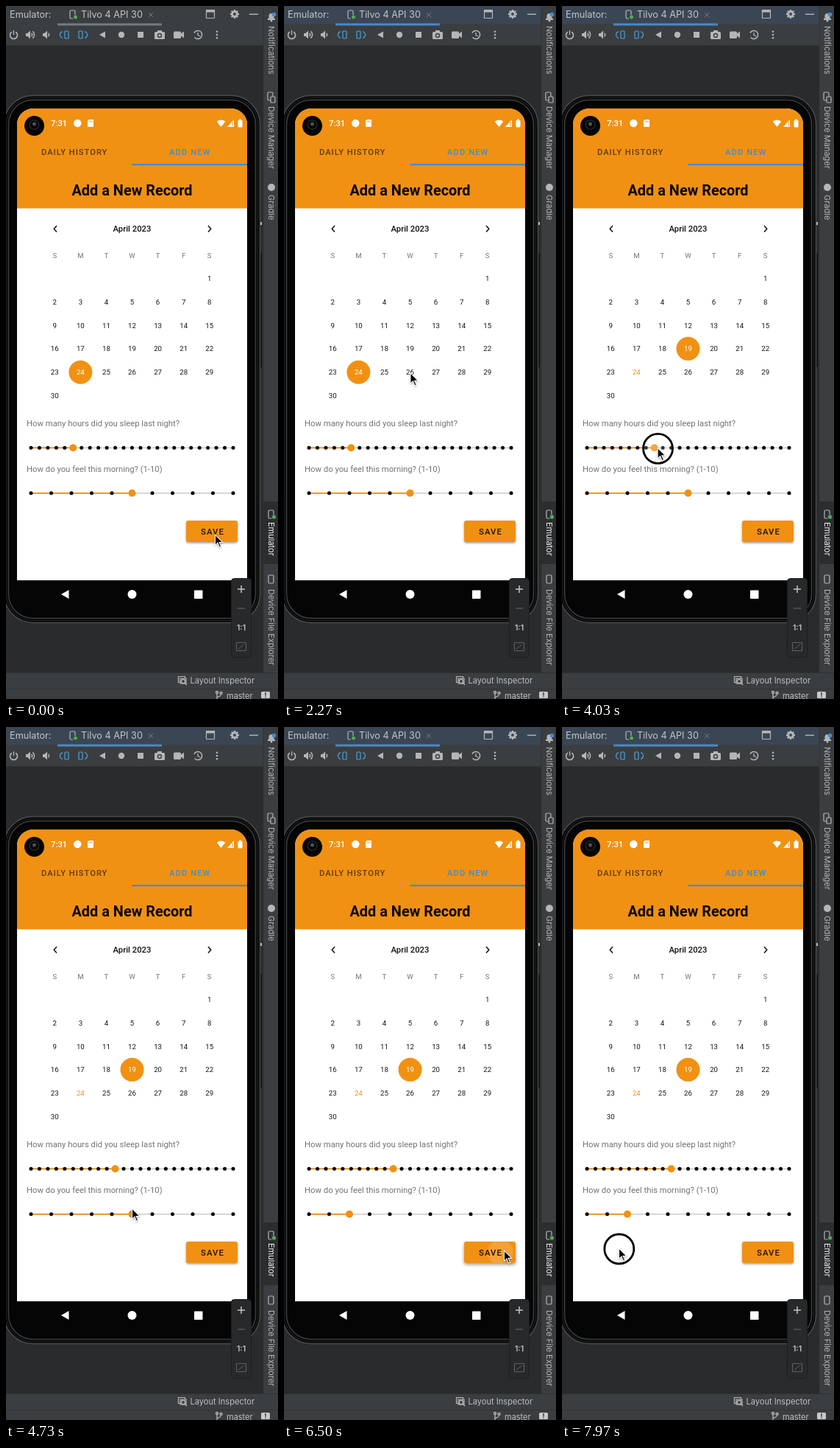
An HTML page with a canvas for the animation above (8 s loop, 370 by 940 pixels).

```html
<!DOCTYPE html>
<html lang="en">
<head>
<meta charset="utf-8">
<title>Add a New Record</title>
<style>
html, body { margin: 0; width: 100%; height: 100%; overflow: hidden; background: #2a2b2d; }
canvas { display: block; width: 370px; height: 940px; }
</style>
</head>
<body>
<canvas id="stage"></canvas>
<script>
const W = 370, H = 940, LOOP = 8000;
const ORANGE = '#f19113', PANEL = '#3b3e40', EDGE = '#303234', ICON = '#b4b6b8', BLUE = '#3c8ed2';
const APP = 'Roboto, sans-serif', UI = 'Inter, sans-serif';
const canvas = document.getElementById('stage');
const c = canvas.getContext('2d');
const dpr = window.devicePixelRatio || 1;
canvas.width = W * dpr;
canvas.height = H * dpr;

const clamp = (v, a = 0, b = 1) => Math.min(b, Math.max(a, v));
const lerp = (a, b, p) => a + (b - a) * p;
const between = (t, a, b) => clamp((t - a) / (b - a));
const ease = p => p * p * (3 - 2 * p);

// Layout
const screen = { x: 15, y: 139, w: 313, h: 640, mid: 171.5 };
const save = { x: 245, y: 698, w: 70, h: 29, r: 3 };
const sleep = { y: 599.3, steps: 24, from: 5, to: 10, start: 3680, end: 4250 };
const mood = { y: 660.8, steps: 10, from: 5, to: 2, start: 5040, end: 5600 };
const tickX = (s, i) => 34 + 275 * i / s.steps;
const onTick = (s, i) => ({ x: tickX(s, i), y: s.y - 1 });
const columnX = i => screen.mid + 35.07 * (i - 3);
const dayAt = d => ({ x: columnX((d + 5) % 7), y: 369.3 + 31.85 * Math.floor((d + 5) / 7) });

// Pointer stops: arrival, hold, place, click
const stop = (t, hold, place, click) => ({ t, hold, click, ...place });
const STOPS = [
  stop(0, 600, { x: 284, y: 716 }, true),
  stop(1170, 0, { x: 209, y: 644 }),
  stop(2270, 0, dayAt(26)),
  stop(2500, 350, dayAt(19), true),
  stop(3230, 0, { x: 162, y: 561 }),
  stop(3550, 130, onTick(sleep, sleep.from)),
  stop(sleep.end, 150, onTick(sleep, sleep.to)),
  stop(4730, 0, { x: 171, y: 652 }),
  stop(4920, 120, onTick(mood, mood.from)),
  stop(mood.end, 150, onTick(mood, mood.to)),
  stop(6250, 430, { x: 299, y: 709 }, true),
  stop(7870, 130, { x: 77, y: 706 }, true)
];
const RIPPLES = [{ t: 780, x: 284 }, { t: 6400, x: 299 }];

function pointerAt(t) {
  const i = STOPS.findLastIndex(s => s.t <= t);
  const a = STOPS[i], b = STOPS[i + 1] || a;
  const p = ease(b === a ? 0 : between(t, a.t + a.hold, b.t));
  return { x: lerp(a.x, b.x, p), y: lerp(a.y, b.y, p) };
}

function isPressed(t) {
  return STOPS.some(s => s.click && t > s.t + 20 && t < s.t + 160) ||
    [sleep, mood].some(s => t > s.start - 60 && t < s.end + 70);
}

const valueAt = (s, t) => Math.round(lerp(s.from, s.to, ease(between(t, s.start, s.end))));

// Drawing helpers
function rect(x, y, w, h, color) {
  c.fillStyle = color;
  c.fillRect(x, y, w, h);
}

function round(x, y, w, h, r, fill, stroke, lw = 1.2) {
  c.beginPath();
  c.roundRect(x, y, w, h, r);
  if (fill) { c.fillStyle = fill; c.fill(); }
  if (stroke) { c.strokeStyle = stroke; c.lineWidth = lw; c.stroke(); }
}

function disc(x, y, r, color) {
  c.fillStyle = color;
  c.beginPath();
  c.arc(x, y, r, 0, 7);
  c.fill();
}

function arc(x, y, r, color, lw = 1.4, a = 0, b = 7) {
  c.strokeStyle = color;
  c.lineWidth = lw;
  c.beginPath();
  c.arc(x, y, r, a, b);
  c.stroke();
}

function line(x0, y0, x1, y1, color = ICON, lw = 1.3) {
  c.strokeStyle = color;
  c.lineWidth = lw;
  c.beginPath();
  c.moveTo(x0, y0);
  c.lineTo(x1, y1);
  c.stroke();
}

// Triangle with a corner at each of two opposite box ends
function triangle(x, y, w, h, color) {
  c.fillStyle = color;
  c.beginPath();
  c.moveTo(x, y);
  c.lineTo(x + w, y - h / 2);
  c.lineTo(x + w, y + h / 2);
  c.fill();
}

function chevron(x, y, dir) {
  line(x - 2 * dir, y - 4.2, x + 2 * dir, y + 0.3, '#111', 1.5);
  line(x + 2 * dir, y - 0.3, x - 2 * dir, y + 4.2, '#111', 1.5);
}

function text(s, x, y, font, color, align = 'left', spacing = 0) {
  c.font = font;
  c.fillStyle = color;
  c.textAlign = align;
  c.letterSpacing = spacing + 'px';
  c.fillText(s, x, y);
  c.letterSpacing = '0px';
}

function sideText(s, y, color = ICON) {
  c.save();
  c.translate(356.8, y);
  c.rotate(Math.PI / 2);
  text(s, 0, 0, '11px ' + UI, color);
  c.restore();
}

function deviceIcon(x, y, running) {
  round(x, y, 7, 11, 1.5, null, ICON);
  if (!running) return;
  rect(x + 4, y + 6, 6, 6, PANEL);
  disc(x + 7.5, y + 9, 2.5, '#4fae54');
}

function speaker(x, waves) {
  rect(x - 6, 37, 3, 4, ICON);
  triangle(x - 6, 39, 6, 11, ICON);
  for (let i = 0; i < waves; i++) arc(x, 39, 2.6 + i * 3, ICON, 1.5, -0.95, 0.95);
}

function rotateIcon(x, dir) {
  round(x - 2.5 + 3.5 * dir, 34, 5, 10, 1, null, '#4aa3df');
  arc(x - dir, 39, 4.5, '#4aa3df', 1.3, dir > 0 ? 1.8 : -1.3, dir > 0 ? 4.5 : 1.3);
}

function toolbar() {
  const slot = i => 1 + 26 * i;
  arc(10.5, 39.5, 5, ICON, 1.6, -1, 4.14);
  line(10.5, 33, 10.5, 39);
  speaker(33, 2);
  speaker(56, 1);
  rotateIcon(slot(3), 1);
  rotateIcon(slot(4), -1);
  triangle(slot(5) - 4, 39, 8, 9, ICON);
  disc(slot(6), 39, 4.2, ICON);
  rect(slot(7) - 4, 35, 8, 8, ICON);
  round(slot(8) - 7, 35, 14, 10, 1.5, ICON);
  rect(slot(8) - 3, 33, 6, 3, ICON);
  arc(slot(8), 40, 2.5, PANEL);
  round(slot(9) - 7, 34.5, 10, 9.5, 1.5, ICON);
  triangle(slot(9) + 1, 39, 6, 9, ICON);
  arc(slot(10), 39, 5.6, ICON, 1.5, -2.7, 2.5);
  line(slot(10), 36, slot(10), 40);
  line(slot(10), 39.5, slot(10) + 3, 41);
  for (let i = -1; i < 2; i++) disc(slot(11), 39 + i * 4.3, 1.3, ICON);
}

function header(focused) {
  const back = focused ? '#3b4655' : PANEL;
  rect(0, 0, 350, 24, back);
  text('Emulator:', 5, 16, '12.7px ' + UI, '#c3c5c7');
  deviceIcon(87, 6, true);
  text('Tilvo 4 API 30', 102, 16, '12.7px ' + UI, '#c3c5c7');
  line(194, 9, 200, 15, '#77797b', 1);
  line(200, 9, 194, 15, '#77797b', 1);
  rect(70, 23.5, 142, 3, focused ? '#4a88c7' : '#747a80');
  round(272.5, 5.5, 11, 11, 0.5, null, ICON);
  rect(272, 5, 12, 3.5, ICON);
  for (let i = 0; i < 4; i++) {
    const dx = 6 * Math.cos(i * Math.PI / 4), dy = 6 * Math.sin(i * Math.PI / 4);
    line(311 - dx, 11 - dy, 311 + dx, 11 + dy, ICON, 2.4);
  }
  arc(311, 11, 3.4, ICON, 2.6);
  disc(311, 11, 2, back);
  rect(331, 10.5, 12, 1.4, ICON);
}

function sideStrip() {
  rect(350, 0, 20, 905, PANEL);
  rect(349.5, 0, 1, 905, EDGE);
  rect(350, 672, 20, 85, '#2b2d2f');
  round(357.5, 10, 7, 8, [3.5, 3.5, 0, 0], ICON);
  rect(356, 17, 10, 2, ICON);
  disc(361, 20, 1.5, ICON);
  disc(364.5, 11.5, 2.8, '#3f8cdc');
  sideText('Notifications', 27);
  deviceIcon(356, 117);
  round(360, 123, 6, 8, 1, PANEL, ICON);
  sideText('Device Manager', 136);
  disc(361, 246, 5, ICON);
  sideText('Gradle', 256);
  deviceIcon(357, 684, true);
  sideText('Emulator', 700, '#f0f0f0');
  deviceIcon(357, 772);
  sideText('Device File Explorer', 791);
}

function footer() {
  rect(0, 904, W, 36, PANEL);
  rect(0, 904, W, 1, EDGE);
  rect(0, 926, W, 1, EDGE);
  round(234.5, 909.5, 9, 8, 0, null, ICON);
  round(237, 912, 8, 7, 0, PANEL, ICON);
  arc(241, 916, 2.7, ICON);
  line(243, 918, 246, 921);
  text('Layout Inspector', 250.5, 919, '11.1px ' + UI, '#bcbec0');
  line(287, 932, 287, 940);
  line(287, 938, 292.5, 935);
  arc(287, 931, 1.5, ICON);
  arc(292.5, 932, 1.5, ICON);
  text('master', 300, 940, '11px ' + UI, '#bcbec0');
  round(347, 930, 12, 9, 1.5, '#c8cacc');
  text('!', 353, 938, 'bold 9px ' + UI, '#333', 'center');
}

function ide(focused) {
  rect(0, 0, W, H, '#2a2b2d');
  rect(0, 0, 350, 53, PANEL);
  rect(0, 53, 350, 1, EDGE);
  header(focused);
  toolbar();
  sideStrip();
  footer();
}

function phoneBody() {
  rect(345, 335, 3, 155, '#111213');
  rect(346, 293, 2, 4, '#c9c9c9');
  const rims = ['#4a4c4e', '#1b1c1d', '#3c3e40'];
  rims.forEach((color, i) => {
    const d = i * 3;
    round(d - 2.5, 121.5 + d, 348 - 2 * d, 715 - 2 * d, 39 - d, '#050505', color, 1.5);
  });
  const { x, y, w, h } = screen;
  round(x, y, w, h, [22, 22, 0, 0], '#fff');
  round(x, y, w, 135.6, [22, 22, 0, 0], ORANGE);
  disc(38.5, 162.5, 13.5, '#050505');
  arc(38.5, 161, 6.3, '#242527', 1.6);
  disc(38.5, 160, 2.6, '#4a4d52');
}

function statusBar() {
  text('7:31', 61, 163, '500 11.3px ' + APP, '#fff');
  disc(97.3, 159, 5.2, '#fff');
  round(111, 154, 8, 10, [3, 1, 1, 1], '#fff');
  for (let i = 0; i < 3; i++) rect(113.2 + i * 1.8, 155.5, 0.9, 2.2, ORANGE);
  c.fillStyle = '#fff';
  c.beginPath();
  c.moveTo(292.5, 164);
  c.arc(292.5, 163, 8.5, -2.3, -0.84);
  c.fill();
  c.beginPath();
  c.moveTo(301, 164);
  c.lineTo(310, 164);
  c.lineTo(310, 154);
  c.fill();
  rect(307.5, 157, 1, 6, ORANGE);
  round(315.5, 155, 6, 9.5, 1, '#fff');
  rect(317, 153.6, 3, 2, '#fff');
}

function appChrome() {
  statusBar();
  text('DAILY HISTORY', 48, 202, '500 11.15px ' + APP, '#5f3b0b', 'left', 1);
  text('ADD NEW', 222, 202, '500 11.15px ' + APP, BLUE, 'left', 1.1);
  rect(screen.mid, 214, 156.5, 2.2, BLUE);
  text('Add a New Record', screen.mid, 257, 'bold 19.9px ' + APP, '#0a0500', 'center');
  triangle(75, 798, 10.5, 12, '#fff');
  disc(screen.mid, 798, 6, '#fff');
  round(256, 792.5, 11.5, 11.5, 0.8, '#fff');
}

function calendar(selected) {
  chevron(67, 302.3, -1);
  chevron(277, 302.3, 1);
  text('April 2023', screen.mid, 306, '500 11.3px ' + APP, '#111', 'center');
  [...'SMTWTFS'].forEach((d, i) => text(d, columnX(i), 342, '9.6px ' + APP, '#777', 'center'));
  for (let day = 1; day <= 30; day++) {
    const { x, y } = dayAt(day);
    if (day === selected) disc(x, y, 16, ORANGE);
    const color = day === selected ? '#fff' : day === 24 ? ORANGE : '#161616';
    text(day, x, y + 3.5, '9.7px ' + APP, color, 'center');
  }
}

function slider(label, s, t) {
  const x = tickX(s, valueAt(s, t));
  text(label, 28, s.y - 29.3, '11.3px ' + APP, '#727272');
  rect(34, s.y - 0.8, 275, 1.6, '#cfcfcf');
  rect(34, s.y - 0.9, x - 34, 1.8, ORANGE);
  for (let i = 0; i <= s.steps; i++) disc(tickX(s, i), s.y, 2.5, '#000');
  disc(x, s.y, 5, ORANGE);
}

function ripple({ x: from }, age, fade) {
  const { x, y, w, h, r } = save;
  const cx = lerp(from, x + w / 2, clamp(age / 390)), cy = y + h / 2;
  const size = 12 + age * 0.055;
  const g = c.createRadialGradient(cx, cy, size * 0.9, cx, cy, size + 1);
  g.addColorStop(0, `rgba(255,255,255,${0.42 * clamp(age / 280) * fade})`);
  g.addColorStop(1, 'rgba(255,255,255,0)');
  round(x, y, w, h, r, g);
}

function saveButton(t) {
  const { x, y, w, h, r } = save;
  const hit = RIPPLES.find(s => t >= s.t && t < s.t + 800);
  const age = hit ? t - hit.t : 0;
  const fade = clamp((800 - age) / 300);
  const lift = ease(clamp(age / 350)) * fade;
  c.save();
  c.shadowColor = 'rgba(0,0,0,.4)';
  c.shadowBlur = lerp(3, 9, lift) * dpr;
  c.shadowOffsetY = lerp(1.5, 5, lift) * dpr;
  round(x, y, w, h, r, ORANGE);
  c.restore();
  if (hit) ripple(hit, age, fade);
  text('SAVE', 265, 717, '500 11.3px ' + APP, '#1c1000', 'left', 1.1);
}

function zoomPanel() {
  const on = '#c4c6c8', off = '#5b5d60';
  round(306.5, 776.5, 27, 107, 4, '#27292b', '#1d1e20', 1);
  line(315, 791, 325, 791, on, 1.5);
  line(320, 786, 320, 796, on, 1.5);
  line(315, 817, 325, 817, off);
  text('1:1', 320, 847, '600 10.5px ' + UI, on, 'center');
  round(313.5, 863.5, 13, 11, 0.5, null, off);
  line(316, 872, 324, 866, off, 1);
}

const ARROW = new Path2D('M1 2.4V14.2L4.1 11.2 6.8 17.6 8 17 5.3 11H9.6Z');

function pointer(t) {
  const { x, y } = pointerAt(t);
  if (isPressed(t)) {
    disc(x + 0.8, y + 2, 20, 'rgba(255,255,255,.2)');
    arc(x + 0.8, y + 2, 20, '#000', 2.8);
  }
  c.save();
  c.translate(x, y);
  c.shadowColor = 'rgba(0,0,0,.35)';
  c.shadowBlur = 2.5 * dpr;
  c.shadowOffsetY = dpr;
  c.strokeStyle = '#fff';
  c.lineWidth = 2;
  c.stroke(ARROW);
  c.shadowColor = 'transparent';
  c.fillStyle = '#000';
  c.fill(ARROW);
  c.restore();
}

function draw(t) {
  c.setTransform(dpr, 0, 0, dpr, 0, 0);
  ide(t >= 130);
  phoneBody();
  appChrome();
  calendar(t < 2700 ? 24 : 19);
  slider('How many hours did you sleep last night?', sleep, t);
  slider('How do you feel this morning? (1-10)', mood, t);
  saveButton(t);
  zoomPanel();
  pointer(t);
}

const start = performance.now();
function tick() {
  draw((performance.now() - start) % LOOP);
  requestAnimationFrame(tick);
}
tick();
</script>
</body>
</html>
```
